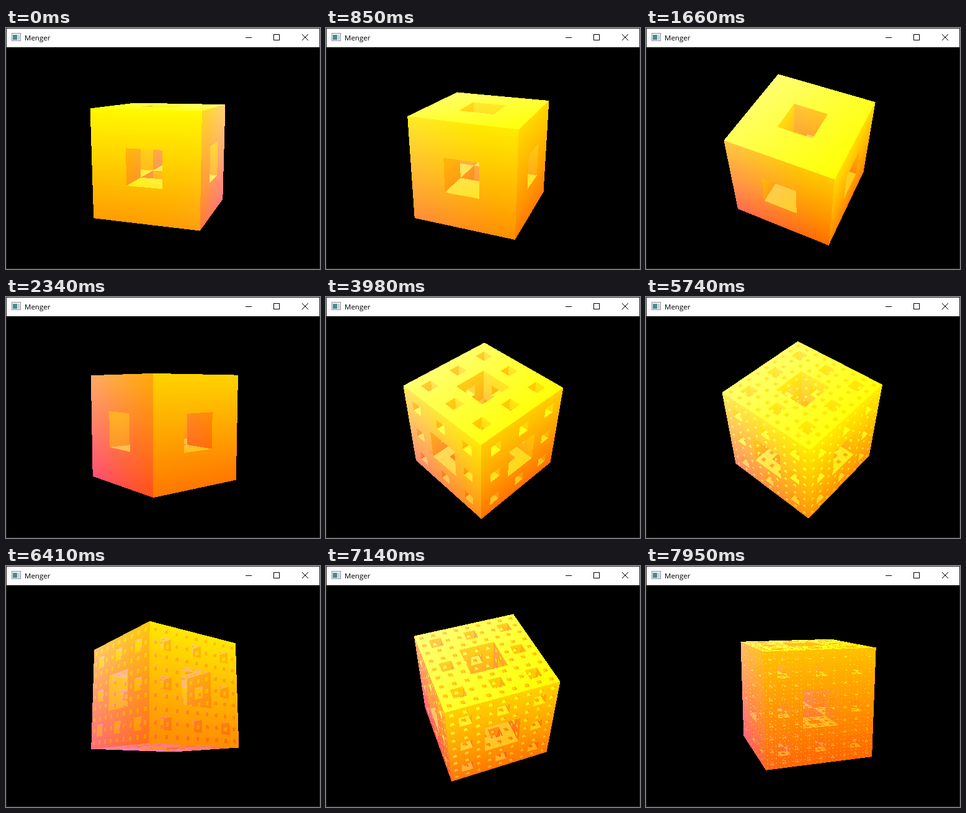
Recreate the animation shown at these times as an HTML page with a canvas. Size 506 by 388 pixels, loop 8000 ms.

```html
<!DOCTYPE html>
<html lang="en">
<head>
<meta charset="utf-8">
<title>Menger</title>
<style>
html, body { margin: 0; width: 100%; height: 100%; overflow: hidden; background: #000; }
canvas, svg { position: absolute; left: 0; top: 0; display: block; }
text { font: 11.5px "Open Sans", "Noto Sans", sans-serif; }
</style>
</head>
<body>
<canvas id="view" width="506" height="388"></canvas>
<svg width="506" height="388" viewBox="0 0 506 388">
  <rect width="506" height="31" fill="#fff"/>
  <rect x=".5" y=".5" width="505" height="387" fill="none" stroke="#222"/>
  <rect x="9.5" y="8.5" width="14" height="12" fill="#f2f2f2" stroke="#8c9196"/>
  <rect x="11" y="11" width="7" height="8" fill="#4c8a94"/>
  <rect x="19" y="11" width="3" height="8" fill="#c9ced2"/>
  <text x="30" y="20">Menger</text>
  <g fill="none" stroke="#000" shape-rendering="crispEdges">
    <path d="M386 15.5h10"/>
    <rect x="431.5" y="10.5" width="9" height="9"/>
  </g>
  <path d="M477 10l10 10m0-10l-10 10" fill="none" stroke="#000"/>
</svg>
<script>
const LOOP = 8000, STEP = 137, LEAD = 36, STEPS_PER_LEVEL = 19;
const FOCAL = 666, DIST = 8, CX = 253, CY = 209.8, PEAK = 49;
const BOX = { x: 110, y: 50, w: 288, h: 322 };
const ctx = document.getElementById('view').getContext('2d');
const image = ctx.createImageData(BOX.w, BOX.h);
const pixels = new Uint32Array(image.data.buffer);

// Key poses: step, yaw and pitch in degrees
const poses = [[0, 26, 10.5], [12, 200.2, 48.3], [17, 263.6, 6], [29, 448.8, 44.2],
  [36, 542, 11.5], [47, 711.1, -10.5], [58, 873.7, 12.3]];

const mix = (a, b, u) => a + (b - a) * u;
const rad = deg => deg * Math.PI / 180;
const byte = v => v < 0 ? 0 : v > 255 ? 255 : Math.round(v);
const wave = (s, period) => Math.cos(2 * Math.PI * s / period);

// Steady spin; the pitch hops up to its peak between poses, once it has got going
function poseAt(s) {
  let i = 0;
  while (i < poses.length - 2 && s >= poses[i + 1][0]) i++;
  const [s0, yaw0, pitch0] = poses[i], [s1, yaw1, pitch1] = poses[i + 1];
  const u = (s - s0) / (s1 - s0);
  const started = Math.min(1, s / 12) ** 4;
  const hop = (PEAK - (pitch0 + pitch1) / 2) * Math.sin(Math.PI * u) ** 2;
  return { yaw: mix(yaw0, yaw1, u), pitch: mix(pitch0, pitch1, mix(u * u, u, started)) + hop * started };
}

// Green follows height and a swaying light; blue grows with depth and towards one side
function lightAt(s) {
  const green = 170 + 24 * wave(s, 38);
  const sway = 28 * wave(s - 50, 33);
  const side = 2 * Math.exp(-s / 4) - 1;
  return (x, y, z, nx, ny) => {
    const g = green + 46 * y + sway * nx + 60 * Math.max(0, ny);
    const b = 33 + side * (38 * x + 28 * nx) - 8 * y - 30 * z + 70 * Math.abs(ny) - 35 * ny;
    return (0xff0000ff | byte(b) << 16 | byte(g) << 8) >>> 0;
  };
}

function isSolid(x, y, z) {
  while (x || y || z) {
    if ((x % 3 === 1) + (y % 3 === 1) + (z % 3 === 1) > 1) return 0;
    x = x / 3 | 0; y = y / 3 | 0; z = z / 3 | 0;
  }
  return 1;
}

const sponges = {};
function sponge(level) {
  if (sponges[level]) return sponges[level];
  const n = 3 ** level, cells = new Uint8Array(n ** 3);
  for (let z = 0, k = 0; z < n; z++)
    for (let y = 0; y < n; y++)
      for (let x = 0; x < n; x++) cells[k++] = isSolid(x, y, z);
  return sponges[level] = { n, cells };
}

function draw(step) {
  const { n, cells } = sponge(1 + Math.floor(step / STEPS_PER_LEVEL));
  const light = lightAt(step), pose = poseAt(step);
  const left = rad(pose.yaw - 45), right = rad(pose.yaw + 45), pitch = rad(pose.pitch);
  const sp = Math.sin(pitch), cp = Math.cos(pitch), half = n / 2;
  const sideX = [Math.sin(left), 0, Math.sin(right)];
  const sideZ = [Math.cos(left), 0, Math.cos(right)];
  const toCube = (x, y, z) => [x * sideX[0] + z * sideZ[0], y, x * sideX[2] + z * sideZ[2]];
  const eye = toCube(0, DIST * sp, DIST * cp).map(v => (v + 1) * half);
  const stride = [1, n, n * n];
  const cell = [0, 0, 0], dir = [0, 0, 0], next = [0, 0, 0], delta = [0, 0, 0], sign = [0, 0, 0];

  function shade(t, axis) {
    const at = a => (eye[a] + dir[a] * t) / half - 1;
    const q0 = at(0), q2 = at(2);
    const x = q0 * sideX[0] + q2 * sideX[2], z = q0 * sideZ[0] + q2 * sideZ[2];
    return light(x, at(1), z, -sign[axis] * sideX[axis], axis === 1 ? -sign[1] : 0);
  }

  // Walk the ray cell by cell until it meets a solid one
  function trace(px, py) {
    const dx = px + 0.5 - CX, dy = CY - py - 0.5;
    const dz = -cp * FOCAL - sp * dy;
    dir[0] = dx * sideX[0] + dz * sideZ[0];
    dir[1] = -sp * FOCAL + cp * dy;
    dir[2] = dx * sideX[2] + dz * sideZ[2];
    let near = -Infinity, far = Infinity, axis = 0;
    for (let a = 0; a < 3; a++) {
      if (Math.abs(dir[a]) < 1e-9) dir[a] = 1e-9;
      sign[a] = dir[a] > 0 ? 1 : -1;
      delta[a] = Math.abs(1 / dir[a]);
      const t0 = ((sign[a] > 0 ? 0 : n) - eye[a]) / dir[a];
      const t1 = ((sign[a] > 0 ? n : 0) - eye[a]) / dir[a];
      if (t0 > near) { near = t0; axis = a; }
      if (t1 < far) far = t1;
    }
    if (near >= far) return 0xff000000;
    for (let a = 0; a < 3; a++) {
      const c = a === axis ? (sign[a] > 0 ? 0 : n - 1) : Math.floor(eye[a] + dir[a] * near);
      cell[a] = Math.min(n - 1, Math.max(0, c));
      next[a] = (cell[a] + (sign[a] > 0 ? 1 : 0) - eye[a]) / dir[a];
    }
    let t = near, k = cell[0] + cell[1] * stride[1] + cell[2] * stride[2];
    while (!cells[k]) {
      axis = next[0] < next[1] ? (next[0] < next[2] ? 0 : 2) : (next[1] < next[2] ? 1 : 2);
      t = next[axis];
      next[axis] += delta[axis];
      cell[axis] += sign[axis];
      if (cell[axis] < 0 || cell[axis] >= n) return 0xff000000;
      k += sign[axis] * stride[axis];
    }
    return shade(t, axis);
  }

  for (let y = 0, k = 0; y < BOX.h; y++)
    for (let x = 0; x < BOX.w; x++) pixels[k++] = trace(x + BOX.x, y + BOX.y);
  ctx.putImageData(image, BOX.x, BOX.y);
}

let shown = -1;
const start = performance.now();
function tick() {
  const t = (performance.now() - start) % LOOP;
  const step = Math.floor((t + LEAD) / STEP);
  if (step !== shown) draw(shown = step);
  requestAnimationFrame(tick);
}
tick();
</script>
</body>
</html>
```
